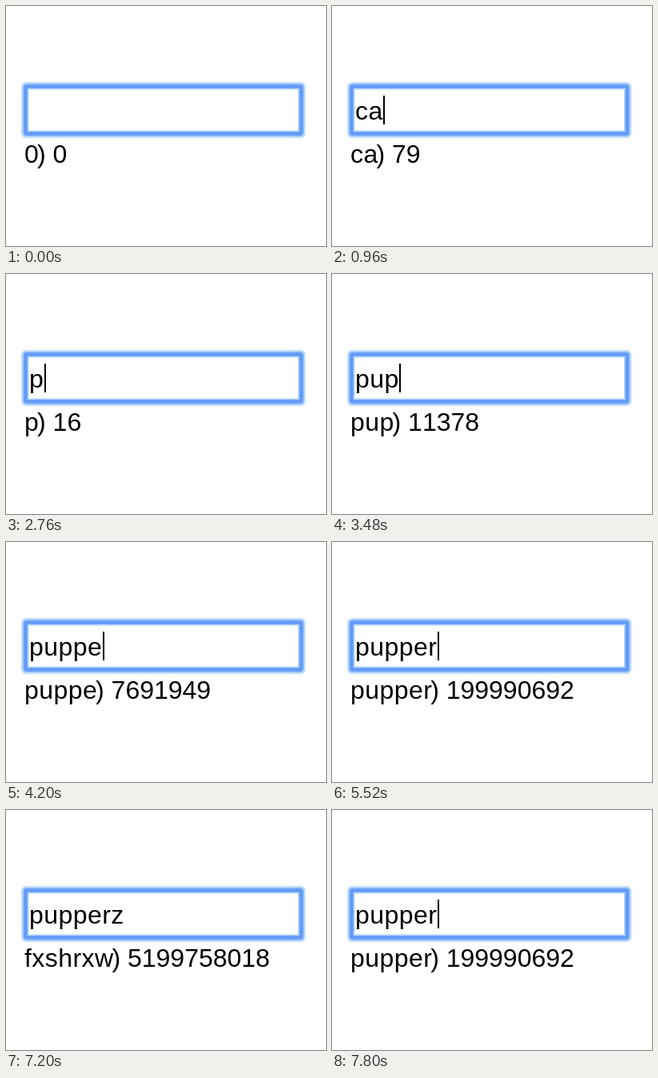
An HTML page with a canvas that plays this animation: 400 by 300 pixels, repeating every 8000 ms.

```html
<!DOCTYPE html>
<html lang="en">
<head>
<meta charset="utf-8">
<title>Letters to numbers</title>
<style>
  html, body { margin: 0; width: 100%; height: 100%; overflow: hidden; background: #fff; }
  canvas { display: block; }
</style>
</head>
<body>
<canvas id="stage" width="400" height="300"></canvas>
<script>
const ctx = document.getElementById('stage').getContext('2d');
const LOOP = 8000;
const BLINK = 480;
const MAX_INT = 2 ** 31 - 1;
const TRACKING = '0.45px';

// Key presses as [time, key]; '<' is backspace.
const KEYS = [
  [720, 'c'], [960, 'a'], [1200, 't'],
  [2040, '<'], [2280, '<'], [2520, '<'],
  [2760, 'p'], [3000, 'u'], [3480, 'p'], [3720, 'p'],
  [4200, 'e'], [4560, 'r'], [5760, 'z'], [7680, '<']
];

// Bijective base 26: a = 1 ... z = 26.
function encode(word) {
  return [...word].reduce((n, ch) => n * 26 + ch.charCodeAt(0) - 96, 0);
}

function decode(n) {
  let word = '';
  for (n = Math.min(n, MAX_INT); n > 0; n = Math.floor((n - 1) / 26)) {
    word = String.fromCharCode(97 + (n - 1) % 26) + word;
  }
  return word || '0';
}

function stateAt(t) {
  let word = '';
  let last = -720;
  for (const [time, key] of KEYS) {
    if (time > t) break;
    word = key === '<' ? word.slice(0, -1) : word + key;
    last = time;
  }
  return { word, caret: Math.floor((t - last) / BLINK) % 2 === 0 };
}

// One layer of the focus ring, inset from its outer edge.
function layer(inset, radius, color) {
  ctx.fillStyle = color;
  ctx.beginPath();
  ctx.roundRect(19 + inset, 95 + inset, 355.5 - 2 * inset, 70 - 2 * inset, radius);
  ctx.fill();
}

function drawField() {
  layer(0, 6, '#c6ddfc');
  layer(1.5, 5, '#b0d0fb');
  layer(2.7, 4, '#6ea5fb');
  layer(4.5, 2, '#5f96f0');
  layer(6.5, 0, '#6ea5fb');
  layer(8, 0, '#b5d4f7');
  layer(9.5, 0, '#fff');
}

// Draws a word and returns its width.
function drawWord(word, x, y) {
  ctx.letterSpacing = TRACKING;
  ctx.fillText(word, x, y);
  const width = ctx.measureText(word).width;
  ctx.letterSpacing = '0px';
  return width;
}

function draw(t) {
  const { word, caret } = stateAt(t);
  const value = encode(word);

  ctx.fillStyle = '#fff';
  ctx.fillRect(0, 0, 400, 300);
  drawField();

  ctx.fillStyle = '#000';
  ctx.font = '32px "Liberation Sans", Arial, sans-serif';
  ctx.fontKerning = 'none';

  const typed = drawWord(word, 29, 142);
  if (caret) ctx.fillRect(Math.round(29.6 + typed), 112, 2, 36);

  const label = drawWord(decode(value), 23, 196);
  ctx.fillText(') ' + value, 20.8 + label, 196);
}

const start = performance.now();
function tick(now) {
  draw(Math.max(0, now - start) % LOOP);
  requestAnimationFrame(tick);
}
draw(0);
requestAnimationFrame(tick);
</script>
</body>
</html>
```
